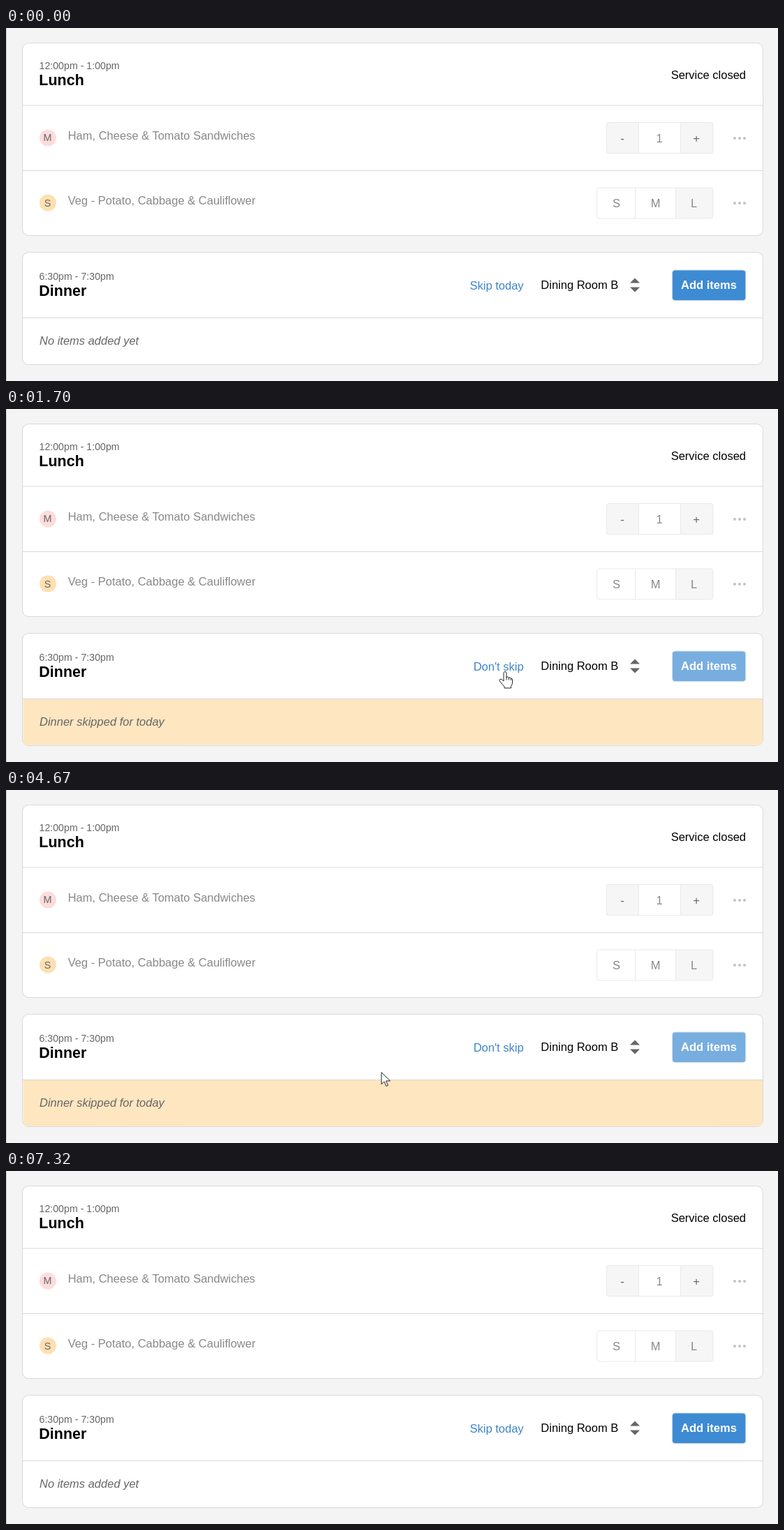
Write an HTML page that moves like this. It is 1106 px wide and 506 px high and loops after 8.52 s.

```html
<!DOCTYPE html>
<html lang="en">
<head>
<meta charset="utf-8">
<title>Meal planner</title>
<style>
  html, body { margin: 0; width: 100%; height: 100%; overflow: hidden; background: #f4f4f4; }
  svg { display: block; width: 1106px; height: 506px; font: 16.5px "Liberation Sans", Arial, sans-serif; }
  .card { fill: #fff; stroke: #d9d9d9; }
  .line { stroke: #d9d9d9; }
  .time { font-size: 14.2px; fill: #666; }
  .title { font-size: 21.5px; font-weight: bold; }
  .dim { fill: #888; }
  .mid { text-anchor: middle; }
  .end { text-anchor: end; }
  .tag { font-size: 14.4px; fill: #666; text-anchor: middle; }
  .box { fill: none; stroke: #e9e9e9; }
  .shade { fill: #f6f6f6; }
  .dots { fill: #c4c4c4; }
  .link { fill: #3d85c6; text-anchor: end; }
  .note { fill: #666; font-style: italic; }
  .cursor { fill: #fff; stroke: #222; stroke-linejoin: round; }
</style>
</head>
<body>
<svg viewBox="0 0 1106 506">
  <defs>
    <g id="dots" class="dots"><circle cx="-7" r="2.1"/><circle r="2.1"/><circle cx="7" r="2.1"/></g>
  </defs>
  <path d="M.5 0V506" stroke="#c9c9c9"/>

  <rect class="card" x="23.5" y="21.5" width="1061" height="276" rx="9"/>
  <path class="line" d="M24 111H1084M24 204.5H1084"/>
  <text class="time" x="47.5" y="59">12:00pm - 1:00pm</text>
  <text class="title" x="47.3" y="82">Lunch</text>
  <text class="end" x="1060" y="72.5">Service closed</text>

  <circle cx="60" cy="157.5" r="12" fill="#fddcdc"/>
  <text class="tag" x="59.5" y="162">M</text>
  <text class="dim" x="88.7" y="160.3">Ham, Cheese &amp; Tomato Sandwiches</text>
  <path class="shade" d="M860 135.5H907V180H860ZM966 135.5H1013V180H966Z"/>
  <rect class="box" x="860.5" y="135.5" width="152.5" height="44" rx="4"/>
  <path class="box" d="M906.5 136V179M966.5 136V179"/>
  <g class="dim mid">
    <text x="883" y="163.5" fill="#666">-</text>
    <text x="936" y="163.5">1</text>
    <text x="989" y="163.5" fill="#666">+</text>
  </g>
  <use href="#dots" x="1051" y="158"/>

  <circle cx="60" cy="250.5" r="12" fill="#fee0b2"/>
  <text class="tag" x="59.5" y="255.5">S</text>
  <text class="dim" x="88.7" y="253">Veg - Potato, Cabbage &amp; Cauliflower</text>
  <path class="shade" d="M959 229H1013V273H959Z"/>
  <rect class="box" x="846.5" y="229" width="166.5" height="44" rx="4"/>
  <path class="box" d="M901.5 229V273M959.5 229V273"/>
  <g class="dim mid">
    <text x="874.5" y="256.5">S</text>
    <text x="930.5" y="256.5">M</text>
    <text x="985.5" y="256.5">L</text>
  </g>
  <use href="#dots" x="1051" y="251"/>

  <rect class="card" x="23.5" y="321.5" width="1061" height="161" rx="9"/>
  <path id="banner" d="M24.5 415.5H1084V475Q1084 481.7 1077 481.7H31.5Q24.5 481.7 24.5 475Z" fill="#fee6c0"/>
  <path class="line" d="M24 415.5H1084"/>
  <text class="time" x="47.5" y="360.8">6:30pm - 7:30pm</text>
  <text class="title" x="47.3" y="383.5">Dinner</text>
  <text class="link" id="link" x="741.6" y="374.7"></text>
  <text x="766.3" y="374">Dining Room B</text>
  <path fill="#666" d="M894 365.5L901 358.5L908 365.5ZM894 371.5L901 378.5L908 371.5Z"/>
  <rect id="button" x="954.5" y="347" width="105.3" height="43.6" rx="4" fill="#3d8bd2" stroke="#c4d6e6"/>
  <text class="mid" x="1007" y="374" fill="#fff" font-weight="bold">Add items</text>
  <text class="note" id="note" x="48" y="454"></text>

  <g id="pointer" class="cursor">
    <path id="arrow" d="M.5 .5V17.5L4.5 13.7L7.3 20.3L9.9 19.2L7.1 12.8H13Z"/>
    <g id="hand">
      <path d="M-1 14V2.5Q-1 .5 1 .5T3 2.5V8.5Q4.5 7 6.5 9Q8.2 8 9.3 10Q11.3 9.5 11.5 12V16Q11.5 19 9.5 21.5V24H0V22L-6.3 14.5Q-8 12 -6 11.2Q-4 10.6 -1 14Z"/>
      <path fill="none" d="M3 8V12.5M6.3 9V12.5M9.3 10V13"/>
    </g>
    <circle id="press" r="14" fill="#ff0" fill-opacity=".47" stroke="none"/>
  </g>
</svg>
<script>
const LOOP = 8520, STEP = 69.5;
const $ = id => document.getElementById(id);
const show = (id, on) => $(id).setAttribute("visibility", on ? "inherit" : "hidden");
const lerp = (a, b, k) => a + (b - a) * k;

// Ease-out sweeps; bend bows the path downwards.
const moves = [
  { start: 280, end: 970, from: [997, 504], to: [714, 376], power: 1.5, bend: 0 },
  { start: 2420, end: 3250, from: [700, 378], to: [53, 468], power: 1.34, bend: 36 },
  { start: 3320, end: 3990, from: [48, 465], to: [187, 465], power: 1, bend: 3 },
  { start: 4320, end: 5230, from: [200, 464], to: [684, 363], power: 2.46, bend: 13 },
  { start: 6770, end: 7320, from: [697, 372], to: [935, 522], power: 1, bend: 0 }
];

function pointerAt(t) {
  const { start, end, from, to, power, bend } = moves.findLast(m => m.start <= t);
  const steps = Math.round((end - start) / STEP);
  const k = Math.min(1, Math.floor((t - start) / (end - start) * steps + 0.1) / steps);
  const e = 1 - (1 - k) ** power;
  return [lerp(from[0], to[0], e), lerp(from[1], to[1], e) + bend * Math.sin(Math.PI * e)];
}

function skipAmount(t) {
  if (t < 1630 || t >= 5900) return 0;
  return t < 1700 || t >= 5770 ? 0.5 : 1;
}

function render(t) {
  const skip = skipAmount(t);
  $("banner").setAttribute("opacity", skip);
  $("button").setAttribute("opacity", 1 - 0.31 * skip);
  $("link").textContent = skip ? "Don't skip" : "Skip today";
  $("note").textContent = skip ? "Dinner skipped for today" : "No items added yet";

  const visible = t >= 280 && t < 7320;
  show("pointer", visible);
  if (!visible) return;
  const [x, y] = pointerAt(t);
  const overLink = x > 664 && x < 742 && y > 356 && y < 382;
  $("pointer").setAttribute("transform", `translate(${x} ${y})`);
  show("hand", overLink);
  show("arrow", !overLink);
  show("press", (t >= 1500 && t < 1630) || (t >= 5630 && t < 5770));
}

const origin = performance.now();
function tick() {
  render((performance.now() - origin) % LOOP);
  requestAnimationFrame(tick);
}
tick();
</script>
</body>
</html>
```
